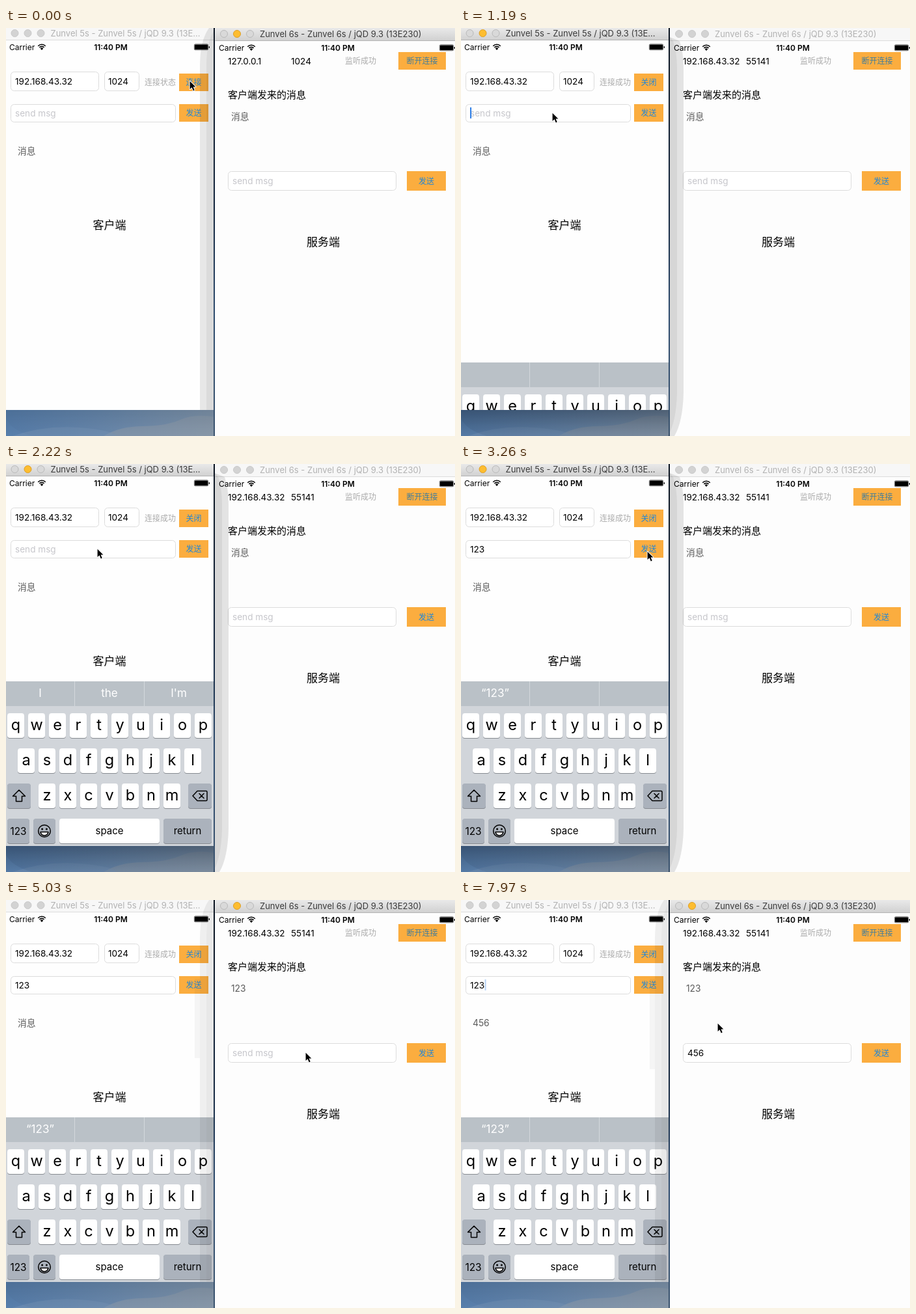
Write an HTML page that moves like this. It is 690x627 px and loops after 8000 ms.

```html
<!DOCTYPE html>
<html lang="zh">
<head>
<meta charset="utf-8">
<title>Socket demo</title>
<style>
html, body { margin: 0; width: 100%; height: 100%; overflow: hidden; background: #fdfdfd; }
svg { display: block; width: 690px; height: 627px; }
text { font-family: Inter, "Noto Sans CJK SC", "Noto Sans CJK", sans-serif; white-space: pre; }
.mid { text-anchor: middle; }
</style>
</head>
<body>
<svg id="stage" viewBox="0 0 690 627">
  <defs>
    <linearGradient id="bar" x2="0" y2="1"><stop stop-color="#e9e9e9"/><stop offset="1" stop-color="#d0d0d0"/></linearGradient>
    <linearGradient id="sky"><stop stop-color="#5a82b0"/><stop offset=".45" stop-color="#6c8db2"/><stop offset="1" stop-color="#879bb0"/></linearGradient>
    <linearGradient id="gap" x2="0" y2="1"><stop stop-color="#0b1420"/><stop offset=".45" stop-color="#14273f"/><stop offset=".7" stop-color="#2d4b6e"/><stop offset="1" stop-color="#3a536e"/></linearGradient>
    <linearGradient id="fall" x2="0" y2="1"><stop stop-color="#101c2c" stop-opacity=".42"/><stop offset=".6" stop-color="#101c2c" stop-opacity=".2"/><stop offset="1" stop-color="#101c2c" stop-opacity=".08"/></linearGradient>
    <clipPath id="phone"><rect width="319" height="587"/></clipPath>
  </defs>
</svg>
<script>
const LOOP = 8000, STEP = 147.7;
const ORANGE = '#fbad3f', BLUE = '#1f86d8', GREY = '#aaaaaa';
const stage = document.getElementById('stage');

const rect = (x, y, w, h, fill, more = '') =>
  `<rect x="${x}" y="${y}" width="${w}" height="${h}" fill="${fill}" ${more}/>`;
const text = (x, y, size, str, fill = '#000', more = '') =>
  `<text x="${x}" y="${y}" font-size="${size}" fill="${fill}" ${more}>${str}</text>`;
const mid = (x, y, size, str, fill, more = '') => text(x, y, size, str, fill, `class="mid" ${more}`);
const field = (x, y, w, h) => rect(x + .5, y + .5, w - 1, h - 1, '#fff', 'rx="5" stroke="#dcdcdc"');
const button = (x, y, w, h, str, fill = BLUE, id = '') =>
  rect(x, y, w, h, ORANGE) + mid(x + w / 2, y + h / 2 + 4.5, 12, str, fill, id && `id="${id}"`);
const path = (d, fill, more = '') => `<path d="${d}" fill="${fill}" ${more}/>`;
const group = (id, body, more = '') => `<g id="${id}" ${more}>${body}</g>`;

function titleBar(x, y, w, str, active) {
  const light = (i) => {
    const yellow = active && i === 1;
    const fill = yellow ? '#fdbd30' : active ? '#d9d9d9' : '#d3d3d3';
    const edge = yellow ? '#dd9f28' : active ? '#b9b9b9' : '#c9c9c9';
    return `<circle cx="${x + 13.5 + 20 * i}" cy="${y + 8}" r="5.5" fill="${fill}" stroke="${edge}"/>`;
  };
  return rect(x, 0, w, y + 19, active ? 'url(#bar)' : '#f7f7f7') +
    rect(x, y + 18, w, 1, active ? '#b4b4b4' : '#dcdcdc') +
    [0, 1, 2].map(light).join('') +
    text(x + 68.5, y + 13, 13, str, active ? '#3a3a3a' : '#b2b2b2');
}

function statusBar(x, y, center, batt) {
  const arc = (r) => {
    const d = r * .72;
    return `M${x + 55 - d} ${y + 14 - d}A${r} ${r} 0 0 1 ${x + 55 + d} ${y + 14 - d}`;
  };
  return text(x + 5, y + 14, 12, 'Carrier') +
    path(arc(8) + arc(5), 'none', 'stroke="#000" stroke-width="1.6"') +
    path(`M${x + 55} ${y + 14.5}l-2.3 -2.6a3.2 3.2 0 0 1 4.6 0z`, '#000') +
    mid(center, y + 14, 12, '11:40 PM', '#000', 'font-weight="600"') +
    rect(batt + .3, y + 5.3, 21.4, 9, 'none', 'rx="1.8" stroke="#000" stroke-width=".6"') +
    rect(batt + 1, y + 6, 20, 7.6, '#000', 'rx="1"') +
    rect(batt + 22.6, y + 8.5, 1.4, 3, '#000', 'rx=".7"');
}

function keyboard() {
  const dark = '#abb2bc';
  const cap = (x, y, w, fill = '#fff') =>
    rect(x, y + 1, w, 38, '#878b91', 'rx="4"') + rect(x, y, w, 38, fill, 'rx="4"');
  const row = (letters, x, y) => [...letters].map((c, i) =>
    cap(x + 32 * i, y, 26) + mid(x + 13 + 32 * i, y + 26, 23.5, c)).join('');
  const line = 'stroke="#000" stroke-width="1.5" stroke-linejoin="round" stroke-linecap="round"';
  return rect(0, 0, 319, 253, '#d1d5da') + rect(0, 0, 319, 38, '#bac1c7') +
    rect(105, 0, 1, 38, '#d3d8dc') + rect(212, 0, 1, 38, '#d3d8dc') +
    [52.5, 159, 265.5].map((x, i) => mid(x, 24, 17, '', '#fff', `id="hint${i}"`)).join('') +
    row('qwertyuiop', 2, 49) + row('asdfghjkl', 18, 103) + row('zxcvbnm', 50, 157) +
    cap(2, 157, 36, dark) + cap(280, 157, 36, dark) +
    path('M20 167l9.5 9.5h-5v8h-9v-8h-5z', 'none', line) +
    path('M287 176l7 -7.5h13.5q1.5 0 1.5 1.5v12q0 1.5 -1.5 1.5h-13.5zM297 172.5l7 7m0 -7l-7 7', 'none', line) +
    cap(2, 211, 34, dark) + cap(42, 211, 34, dark) + cap(82, 211, 154) + cap(242, 211, 74, dark) +
    mid(19, 236, 15.3, '123') + mid(159, 235, 15, 'space') + mid(279, 235, 15, 'return') +
    `<circle cx="59" cy="230" r="9.3" fill="none" ${line}/>` +
    '<circle cx="55.6" cy="227" r="1.5"/><circle cx="62.4" cy="227" r="1.5"/>' +
    path('M53 231.5h12q-1 5.5 -6 5.5t-6 -5.5z', '#f4f4f4', line);
}

// Soft edge cast over the neighbouring window, in two bands.
const leftEdge = (x) => `M319 0H${x + 14}C${x + 5} 13 ${x} 30 ${x} 60V587H319z`;
const rightEdge = (x) => `M321 14L${x - 6} 20Q${x} 38 ${x} 62V560Q${x - 1} 605 ${x - 14} 627H321z`;

const desktop = rect(0, 587, 321, 40, 'url(#sky)') +
  path('M150 627Q175 612 210 612T268 602T321 598V627z', '#9aa6b2', 'opacity=".5"') +
  path('M10 627Q60 610 112 614T170 627z', '#7d9cbf', 'opacity=".4"') +
  group('deskShade', rect(0, 587, 321, 40, 'url(#fall)') +
    path('M0 587H321V627H40Q8 618 0 600z', '#1d3350', 'opacity=".1"')) +
  rect(319, 0, 2, 627, 'url(#gap)');

const name = (n, build) => `Zunvel ${n}s - Zunvel ${n}s / jQD 9.3 (13E${build}`;
const client = rect(0, 0, 319, 587, '#fefefe') +
  group('leftOn', titleBar(0, 0, 319, name(5, '…'), true)) +
  group('leftOff', titleBar(0, 0, 319, name(5, '…'), false)) +
  statusBar(0, 19.5, 161, 289) +
  field(7, 67, 136, 30) + text(14, 87, 13.6, '192.168.43.32') +
  field(151, 67, 54, 30) + text(157, 87, 13.6, '1024') +
  text(213, 87.5, 12, '', GREY, 'id="link"') +
  button(266, 70, 45, 27, '', BLUE, 'linkBtn') +
  field(7, 117, 254, 28) + text(14, 135.5, 13.6, '', '#000', 'id="leftText"') +
  rect(14, 122, 2, 17, '#2f7fe6', 'id="leftCaret"') +
  button(266, 117, 45, 27, '发送') +
  text(18, 194, 13.8, '', '#5a5a5a', 'id="leftMsg"') +
  mid(159, 309, 17, '客户端') +
  group('keys', keyboard());

const server = rect(321, 0, 369, 627, '#fdfdfd') +
  group('rightOn', titleBar(321.5, 1, 369, name(6, '230)'), true)) +
  group('rightOff', titleBar(321.5, 1, 369, name(6, '230)'), false)) +
  statusBar(322, 20.5, 510, 666) +
  text(341, 55.5, 13.5, '', '#000', 'id="peer"') + text(438, 55.5, 13.6, '', '#000', 'id="port"') +
  text(521, 55, 12, '监听成功', GREY) +
  button(603, 37, 73, 27, '断开连接', '#3f7c9c') +
  text(341, 108, 15, '客户端发来的消息') +
  text(346, 140.5, 13.8, '', '#5a5a5a', 'id="rightMsg"') +
  field(341, 220, 259, 30) + text(348, 239.5, 13.6, '', '#000', 'id="rightText"') +
  rect(348, 226, 2, 17, '#2f7fe6', 'id="rightCaret"') +
  button(616, 220, 60, 30, '发送') +
  mid(487.5, 335, 17, '服务端');

const shades =
  group('overLeft', path(leftEdge(298), '#000', 'opacity=".09"') + path(leftEdge(308), '#000', 'opacity=".05"')) +
  group('overRight', path(rightEdge(342), '#000', 'opacity=".1"') + path(rightEdge(332), '#000', 'opacity=".06"')) +
  rect(290, 121, 8, 122, '#000', 'id="leftPatch" opacity=".035"') +
  rect(342, 121, 8, 141, '#000', 'id="rightPatch" opacity=".035"');

const arrow = path('M.6 .8V13L3.6 10.3L5.8 15.4L7.7 14.6L5.6 9.6H9.4z', '#000',
  'id="mouse" stroke="#fff" stroke-width="2" stroke-linejoin="round" paint-order="stroke"');

stage.insertAdjacentHTML('beforeend',
  desktop + group('client', client, 'clip-path="url(#phone)"') + server + shades + arrow);

const el = (id) => document.getElementById(id);
const fade = (id, value) => el(id).setAttribute('opacity', Number(value));
const say = (id, str) => { if (el(id).textContent !== str) el(id).textContent = str; };

// Pointer way points: step, x, y
const route = [
  [0, 282, 81], [2, 282, 81], [6, 140, 130], [18, 140, 130], [22, 286, 134], [25, 286, 134],
  [30, 460, 234], [41, 460, 234], [43, 526, 234], [46, 645, 238], [49, 645, 238], [54, 394, 189]
];
function along(k) {
  const i = Math.max(1, route.findIndex((p) => p[0] >= k));
  const [a, b] = [route[i - 1], route[i]];
  const f = (k - a[0]) / (b[0] - a[0]);
  return [a[1] + (b[1] - a[1]) * f, a[2] + (b[2] - a[2]) * f];
}

// One second cycle: lit for half of it, with short fades.
function blink(ms, start) {
  const p = (((ms - start) % 1000) + 1000) % 1000;
  return p < 60 ? .5 : p < 450 ? 1 : p < 490 ? .35 : 0;
}

function typed(id, str, count) {
  say(id, count ? str.slice(0, count) : 'send msg');
  el(id).setAttribute('fill', count ? '#000' : '#c6c6cb');
}

const keysHit = (n) => Math.max(0, Math.min(3, n));
const rise = { 8: 514, 9: 375, 10: 337 };

function draw(time) {
  const k = Math.min(54, Math.floor((time + 7) / STEP));
  const ms = k * STEP;
  const linked = k >= 2, leftActive = k >= 1 && k < 31;

  fade('leftOn', leftActive);
  fade('leftOff', !leftActive);
  fade('rightOn', !leftActive);
  fade('rightOff', leftActive);
  fade('deskShade', leftActive ? 1 : .4);
  fade('overRight', leftActive);
  fade('overLeft', leftActive ? 0 : k < 31 ? 1 : .65);
  fade('rightPatch', k >= 26 && leftActive ? .035 : 0);
  fade('leftPatch', k >= 31 ? .035 : 0);
  el('leftPatch').setAttribute('height', k < 50 ? 122 : 139);

  say('link', linked ? '连接成功' : '连接状态');
  say('linkBtn', linked ? '关闭' : '连接');
  say('peer', linked ? '192.168.43.32' : '127.0.0.1');
  say('port', linked ? '55141' : '1024');
  say('rightMsg', k >= 25 ? '123' : '消息');
  say('leftMsg', k >= 50 ? '456' : '消息');

  const a = keysHit(k - 15), b = keysHit(k - 35);
  typed('leftText', '123', a);
  typed('rightText', '456', b);
  el('leftCaret').setAttribute('x', [14, 20.5, 28.5, 36.5][a]);
  el('rightCaret').setAttribute('x', [348, 356.5, 365, 373.5][b]);
  const fresh = k >= 8 && k < 11 || k >= 16 && k < 19;
  fade('leftCaret', k < 8 ? 0 : fresh ? 1 : blink(ms, 1520));
  fade('rightCaret', k < 32 ? 0 : k > 35 && k < 39 ? 1 : blink(ms, 4200));

  const hints = a ? [`“${'123'.slice(0, a)}”`, '', ''] : k >= 10 ? ['I', 'the', "I'm"] : ['', '', ''];
  hints.forEach((h, i) => say('hint' + i, h));
  const y = k < 8 ? 587 : rise[k] || 334;
  el('keys').setAttribute('transform', `translate(0 ${y})`);
  el('mouse').setAttribute('transform', `translate(${along(k).join(' ')})`);
}

function tick() {
  draw(performance.now() % LOOP);
  requestAnimationFrame(tick);
}
tick();
</script>
</body>
</html>
```
